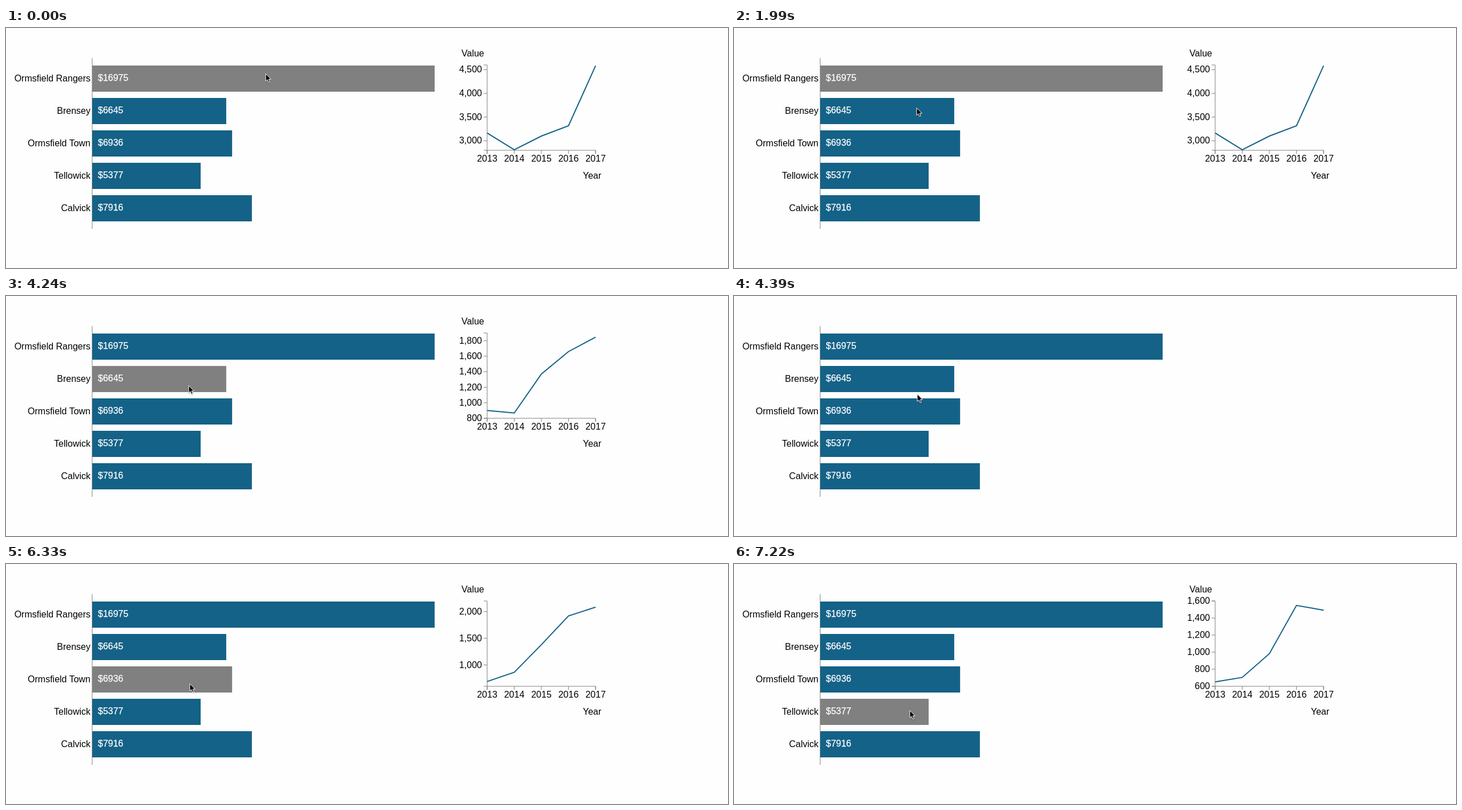
An HTML page for the animation above (8000 ms loop, 1265 by 422 pixels).

```html
<!DOCTYPE html>
<html lang="en">
<head>
<meta charset="utf-8">
<title>Club values</title>
<style>
html, body { margin: 0; width: 100%; height: 100%; overflow: hidden; background: #fefefe; }
svg { display: block; }
text { font: 16px "Liberation Sans", Arial, Helvetica, sans-serif; fill: #000; }
.axis { fill: none; stroke: #808080; stroke-width: 1; }
.amount { fill: #fff; stroke: #fff; stroke-width: 0.25; }
.end { text-anchor: end; }
.mid { text-anchor: middle; }
.line { fill: none; stroke: #146287; stroke-width: 2; }
</style>
</head>
<body>
<svg width="1265" height="422" viewBox="0 0 1265 422">
  <defs>
    <filter id="shade" x="-50%" y="-50%" width="200%" height="200%">
      <feDropShadow dx="0" dy="1" stdDeviation="0.8" flood-color="#000" flood-opacity="0.35"/>
    </filter>
  </defs>
  <path class="axis" d="M151 53V353"/>
  <g id="bars"></g>
  <g id="chart"></g>
  <path id="cursor" filter="url(#shade)" fill="#000" stroke="#fff"
    d="M0 .5V13.6L3 10.8L5 15.6L7.3 14.6L5.3 10H9.4Z"/>
</svg>
<script>
const LOOP = 8000, BEAT = 148;
const BLUE = '#146287', GRAY = '#808080';
const LEFT = 843, TOP = 65, WIDTH = 190, HEIGHT = 150;
const RIGHT = LEFT + WIDTH, BOTTOM = TOP + HEIGHT;

// yearly values from 2013 on
const clubs = [
  { name: 'Ormsfield Rangers', values: [3165, 2810, 3100, 3317, 4583] },
  { name: 'Brensey', values: [901, 868, 1370, 1660, 1846] },
  { name: 'Ormsfield Town', values: [689, 863, 1380, 1920, 2084] },
  { name: 'Tellowick', values: [651, 704, 982, 1548, 1492] },
  { name: 'Calvick', values: [7916] }
];

// selected club from each time on, -1 for none
const picks = [[0, 0], [2140, 1], [4390, -1], [4540, 2], [6930, -1], [7070, 3]];

// pointer glides, one hop per beat; power above 1 slows down, below 1 speeds up
const glides = [
  { at: 0, hops: 1, x: 455, y: 80, power: 1 },
  { at: 500, hops: 5, x: 327, y: 98, power: 2 },
  { at: 1700, hops: 1, x: 325, y: 104, power: 1 },
  { at: 1990, hops: 2, x: 319, y: 146, power: 2.8 },
  { at: 4240, hops: 3, x: 324, y: 205, power: 0.52 },
  { at: 6330, hops: 7, x: 308, y: 257, power: 0.7 }
];

const byId = id => document.getElementById(id);
const text = (x, y, str, cls = '') => `<text x="${x}" y="${y}" class="${cls}">${str}</text>`;

const totals = clubs.map(c => c.values.reduce((a, b) => a + b));
const scale = 600 / Math.max(...totals);

byId('bars').innerHTML = clubs.map((club, i) => {
  const y = 66 + 57 * i;
  return `<rect x="151" y="${y}" width="${scale * totals[i]}" height="46"/>` +
    text(148, y + 28.12, club.name, 'end') +
    text(161, y + 27, '$' + totals[i], 'amount');
}).join('');
const rects = document.querySelectorAll('#bars rect');

// round step that splits a span into about `count` parts
function niceStep(span, count) {
  const base = 10 ** Math.floor(Math.log10(span / count));
  const err = count * base / span;
  return base * (err <= .15 ? 10 : err <= .35 ? 5 : err <= .75 ? 2 : 1);
}

function chartMarkup({ values }) {
  const min = Math.min(...values), max = Math.max(...values);
  const grain = niceStep(max - min, 10);
  const lo = Math.floor(min / grain) * grain, hi = Math.ceil(max / grain) * grain;
  const step = niceStep(hi - lo, 5);
  const x = i => LEFT + WIDTH * i / (values.length - 1);
  const y = v => BOTTOM - HEIGHT * (v - lo) / (hi - lo);

  let axis = `M${LEFT - 6} ${TOP}H${LEFT}V${BOTTOM}H${LEFT - 6}` +
    `M${LEFT} ${BOTTOM + 6}V${BOTTOM}H${RIGHT}V${BOTTOM + 6}`;
  let labels = text(798, 50, 'Value') + text(1043, 265, 'Year', 'end');

  for (let v = Math.ceil(lo / step) * step; v <= hi; v += step) {
    axis += `M${LEFT - 6} ${y(v)}H${LEFT}`;
    labels += text(LEFT - 9, y(v) + 5.12, v.toLocaleString('en-US'), 'end');
  }
  values.forEach((v, i) => {
    axis += `M${x(i)} ${BOTTOM}V${BOTTOM + 6}`;
    labels += text(x(i), BOTTOM + 20.36, 2013 + i, 'mid');
  });
  const points = values.map((v, i) => `${x(i)},${y(v)}`).join(' ');
  return `<path class="axis" d="${axis}"/>${labels}<polyline class="line" points="${points}"/>`;
}

let shown = null;
function select(pick) {
  if (pick === shown) return;
  shown = pick;
  rects.forEach((r, i) => r.setAttribute('fill', i === pick ? GRAY : BLUE));
  byId('chart').innerHTML = pick < 0 ? '' : chartMarkup(clubs[pick]);
}

function pointerAt(t) {
  const i = glides.filter(g => g.at <= t).length - 1;
  const to = glides[i], from = glides[i - 1] || to;
  const hop = Math.min(to.hops, Math.floor((t - to.at) / BEAT) + 1);
  const k = 1 - (1 - hop / to.hops) ** to.power;
  const mix = (a, b) => Math.round(a + (b - a) * k);
  return [mix(from.x, to.x), mix(from.y, to.y)];
}

function draw(t) {
  select(picks.filter(p => p[0] <= t).pop()[1]);
  byId('cursor').setAttribute('transform', `translate(${pointerAt(t).join(' ')})`);
}

const start = performance.now();
function tick(now) {
  draw(Math.max(0, now - start) % LOOP);
  requestAnimationFrame(tick);
}
draw(0);
requestAnimationFrame(tick);
</script>
</body>
</html>
```
